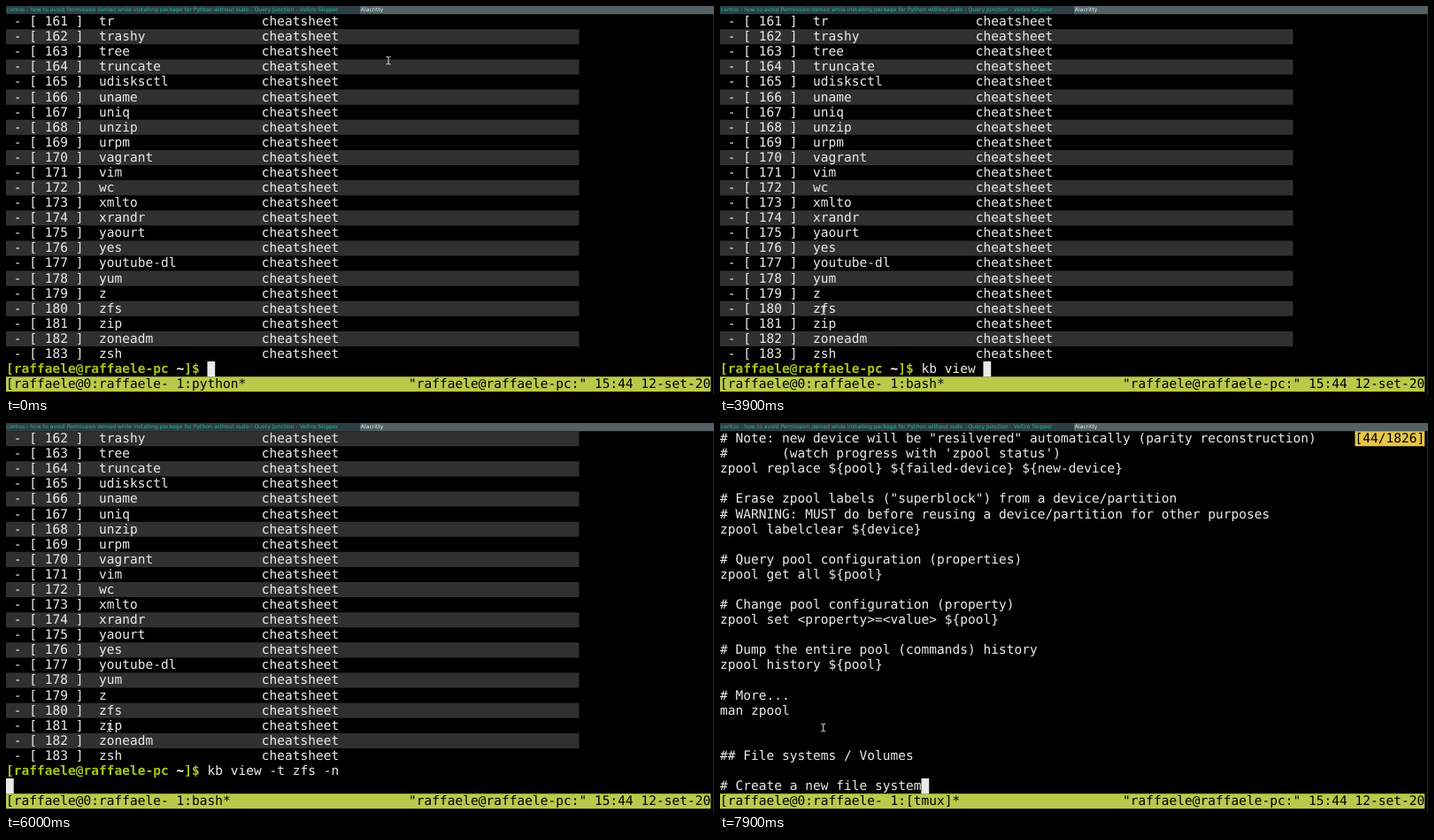
Animation of 800x440 px, one loop 8 s. Source, as an HTML page:

```html
<!DOCTYPE html>
<html lang="en">
<head>
<meta charset="utf-8">
<title>Terminal session</title>
<style>
  html, body { margin: 0; width: 100%; height: 100%; overflow: hidden; background: #000; }
  /* The desktop is laid out in its own pixels, one text cell being 21 x 41.
     The invisible rotation keeps baselines from snapping to whole pixels. */
  #desk {
    position: absolute; left: 0; top: 0; width: 1920px; height: 1056px;
    overflow: hidden; transform: scale(.4166667) rotate(.002deg); transform-origin: 0 0;
    text-rendering: geometricPrecision; background: #000;
  }
  #desk::after {
    content: ""; position: absolute; right: 0; top: 22px; width: 1px; height: 1034px; background: #556064;
  }
  .tab {
    position: absolute; top: 0; width: 958px; height: 22px; padding-left: 2px;
    font: 14.67px/22px "DejaVu Sans", sans-serif; white-space: pre;
    background: #2f3d44; color: #1abc9c;
  }
  .tab.on { left: 960px; background: #556064; color: #d4fbf8; }
  #term {
    position: absolute; left: 0; top: 22px; width: 1911px;
    font: 34.88px/41px "DejaVu Sans Mono", monospace; color: #eaeaea;
  }
  .row { position: relative; height: 41px; white-space: pre; }
  .row.odd { background: linear-gradient(#303030, #303030) 0 0 / 1554px 41px no-repeat; }
  .row.status { background: #b9ca4a; color: #000; }
  .right { position: absolute; right: 0; top: 0; }
  .prompt { color: #a9c41a; font-weight: bold; }
  .prompt i { color: #fff; font-style: normal; }
  .sel { display: inline-block; height: 41px; vertical-align: top; background: #eaeaea; color: #000; }
  #block { position: absolute; width: 21px; height: 41px; background: #eaeaea; }
  #count { position: absolute; right: 0; top: 0; height: 41px; background: #e6c547; color: #000; white-space: pre; }
  #mouse { position: absolute; left: -8px; top: -13px; width: 16px; height: 26px; }
  #mouse path { fill: none; stroke: #f4f4f4; stroke-width: 2.2; }
</style>
</head>
<body>
<div id="desk">
  <div class="tab">centos - how to avoid Permission denied while installing package for Python without sudo - Query Junction - Velliro Skipper</div>
  <div class="tab on">Alacritty</div>
  <div id="term"></div>
  <svg id="mouse" viewBox="-8 -13 16 26"><path d="M-6-10h3q3 0 3 3v14q0 3-3 3h-3M6-10h-3q-3 0-3 3M6 10h-3q-3 0-3-3"/></svg>
</div>
<script>
const LOOP = 8000, STEP = 100, ROWS = 24, SCALE = 800 / 1920;
const USER = "raffaele", HOST = USER + "-pc";
const PROMPT_COLS = 26;

const COMMAND = "kb view -t zfs -n";
const KEY_TIMES = [2900, 3000, 3200, 3300, 3500, 3700, 3800, 3900, 4200,
                   4500, 4600, 4800, 5200, 5300, 5400, 5600, 5800];
const SELECT = 2200, ENTER = 6000, OUTPUT = 6300, PAGE_1 = 6900, PAGE_2 = 7400;

// time, x, y of the pointer
const PATH = [[100, 432, 61.5], [1400, 112, 367.5], [1500, 112, 367.5], [1600, 115.5, 362.5],
              [1700, 115.5, 362.5], [2000, 116.5, 344.5]];

const NAMES = ("tr trashy tree truncate udisksctl uname uniq unzip urpm vagrant vim wc xmlto " +
  "xrandr yaourt yes youtube-dl yum z zfs zip zoneadm zsh").split(" ");

const SHEET = `# Note: new device will be "resilvered" automatically (parity reconstruction)
#       (watch progress with 'zpool status')
zpool replace \${pool} \${failed-device} \${new-device}

# Erase zpool labels ("superblock") from a device/partition
# WARNING: MUST do before reusing a device/partition for other purposes
zpool labelclear \${device}

# Query pool configuration (properties)
zpool get all \${pool}

# Change pool configuration (property)
zpool set <property>=<value> \${pool}

# Dump the entire pool (commands) history
zpool history \${pool}

# More...
man zpool


## File systems / Volumes

# Create a new file system
zfs create \${pool}/\${fs_vol}

# Create a new volume ("block device")
# Note: look for it in /dev/zvol/\${pool}/\${fs_vol}
zfs create -V \${size} \${pool}/\${fs_vol}

# List available file systems / volumes
zfs list
zfs list -t snapshot

# Create a snapshot
zfs snapshot \${pool}/\${fs_vol}@\${snapshot}

# Delete a snapshot
zfs destroy \${pool}/\${fs_vol}@\${snapshot}

# Restore a snapshot
zfs rollback \${pool}/\${fs_vol}@\${snapshot}

# Full backup
# Note: pipe (|) source to destination through netcat, SSH, etc.
# ... on source:
zfs send -p -R \${pool}/\${fs_vol}@\${snapshot}
# ... on destination:
zfs receive -F \${pool}/\${fs_vol}

# Incremental backup
# Note: pipe (|) source to destination through netcat, SSH, etc.
# ... on source:
zfs send -p -R -i \${pool}/\${fs_vol}@\${snapshot-previous} \${pool}/\${fs_vol}@\${snapshot}
# ... on destination:
zfs receive -F \${pool}/\${fs_vol}

# Query file system / volume configuration (properties)
zfs get all \${pool}
zfs get all \${pool}/\${fs_vol}

# Change file system / volume configuration (property)
zfs set <property>=<value> \${pool}/\${fs_vol}

# More...
man zfs
`.split("\n");

const term = document.getElementById("term");
const mouse = document.getElementById("mouse");

const row = (html, kind = "") => `<div class="row ${kind}">${html}</div>`;
const plain = text => row(text.replace(/&/g, "&amp;").replace(/</g, "&lt;"));
const prompt = (typed = "") =>
  row(`<span class="prompt">[${USER}@${HOST} <i>~</i>]$</span> ${typed}`);

function listRow(name, i, picked) {
  const id = 161 + i;
  const label = picked && name === "zfs" ? `<span class="sel">${name}</span>` : name;
  return row(` - [ ${id} ]  ${label}${" ".repeat(21 - name.length)}cheatsheet`, id % 2 ? "" : "odd");
}

function statusRow(job) {
  return row(`[${USER}@0:${USER}- 1:${job}*` +
    `<span class="right">"${USER}@${HOST}:" 15:44 12-set-20</span>`, "status");
}

function screen(t) {
  const typed = COMMAND.slice(0, KEY_TIMES.filter(k => k <= t).length);
  let lines, col = PROMPT_COLS, count = "";
  let job = t < KEY_TIMES[0] ? "python" : "bash";

  if (t < OUTPUT) {
    const picked = t >= SELECT && t < KEY_TIMES[0];
    lines = NAMES.map((name, i) => listRow(name, i, picked));
    lines.push(prompt(typed));
    col += typed.length;
    if (t >= ENTER) {
      lines.push(plain(""));
      col = 0;
    }
    lines = lines.slice(-ROWS);
  } else {
    const back = t < PAGE_1 ? 0 : t < PAGE_2 ? 22 : 44;
    const all = SHEET.map(plain).concat(prompt());
    const top = all.length - ROWS - back;
    lines = all.slice(top, top + ROWS);
    if (back) {
      job = "[tmux]";
      count = `<div id="count">[${back}/1826]</div>`;
    }
  }
  const block = `<div id="block" style="left:${col * 21}px;top:${(ROWS - 1) * 41}px"></div>`;
  return lines.join("") + statusRow(job) + count + block;
}

function pointer(t) {
  const next = PATH.findIndex(p => p[0] > t);
  if (next === 0) return PATH[0].slice(1);
  if (next < 0) return PATH[PATH.length - 1].slice(1);
  const [t0, x0, y0] = PATH[next - 1], [t1, x1, y1] = PATH[next];
  let u = (t - t0) / (t1 - t0);
  if (next === 1) u = u * u * (3 - 2 * u);
  return [x0 + (x1 - x0) * u, y0 + (y1 - y0) * u];
}

let shown = "";
function draw() {
  const t = Math.floor(performance.now() % LOOP / STEP) * STEP;
  const html = screen(t);
  if (html !== shown) term.innerHTML = shown = html;
  const [x, y] = pointer(t);
  mouse.setAttribute("style", `left:${x / SCALE - 8}px;top:${y / SCALE - 13}px`);
  requestAnimationFrame(draw);
}
draw();
</script>
</body>
</html>
```
